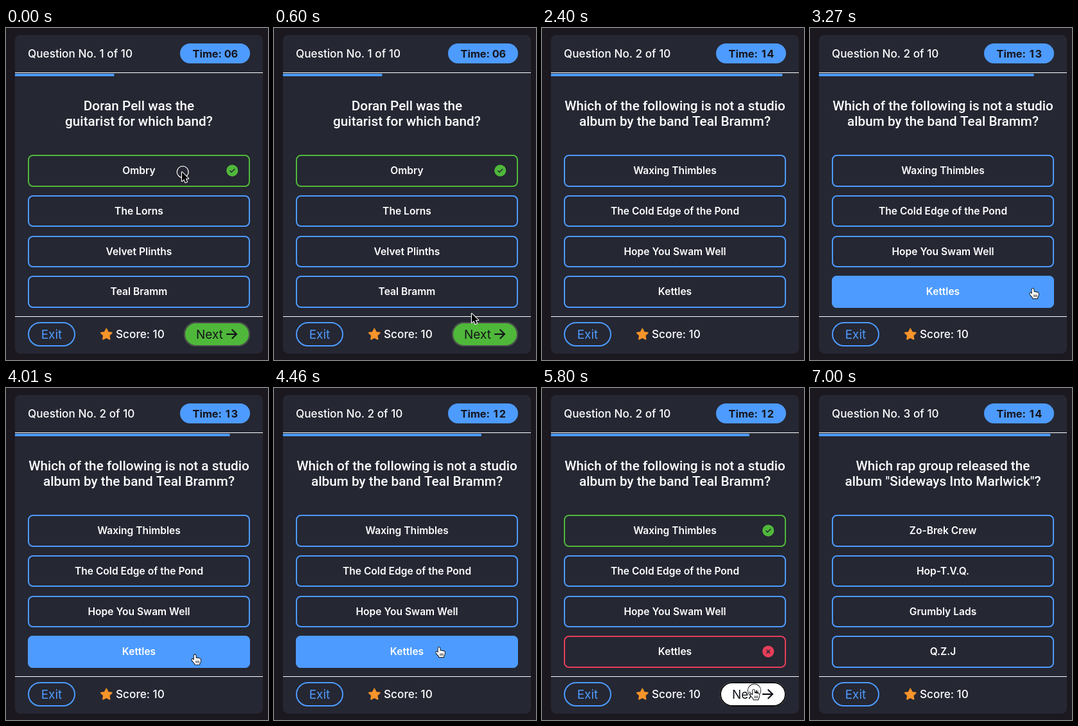
Write an HTML page with a canvas that moves like this. It is 408 px wide and 516 px high and loops after 7300 ms.

```html
<!DOCTYPE html>
<html lang="en">
<head>
<meta charset="utf-8">
<title>Music quiz</title>
<style>
  html, body { margin: 0; width: 100%; height: 100%; overflow: hidden; background: #1b191f; }
  canvas { display: block; width: 408px; height: 516px; }
</style>
</head>
<body>
<canvas id="stage"></canvas>
<script>
const W = 408, H = 516, LOOP = 7300;
const BG = '#1b191f', CARD = '#252733', BLUE = '#4d9bff', GREEN = '#4fb83a',
      RED = '#e63e58', WHITE = '#fff', INK = '#16141b', ORANGE = '#f8952a';
const UI = 'Inter, "Open Sans", sans-serif';
const HEAD = 'Roboto, Inter, sans-serif';

const QUESTIONS = [
  { title: ['Doran Pell was the', 'guitarist for which band?'],
    options: ['Ombry', 'The Lorns', 'Velvet Plinths', 'Teal Bramm'], right: 0, pick: 0 },
  { title: ['Which of the following is not a studio', 'album by the band Teal Bramm?'],
    options: ['Waxing Thimbles', 'The Cold Edge of the Pond', 'Hope You Swam Well', 'Kettles'], right: 0, pick: 3 },
  { title: ['Which rap group released the', 'album "Sideways Into Marlwick"?'],
    options: ['Zo-Brek Crew', 'Hop-T.V.Q.', 'Grumbly Lads', 'Q.Z.J'] }
];

// Moments in ms
const SECOND = 1350, ENTER = 3270, ANSWER = 4610, THIRD = 6100;
const TICKS = [2400, ENTER, 4310];
const CLICKS = [0, 1200, ANSWER, 5800];
const CLICK_LEN = 150;

// Pointer way points: time, x, y
const PATH = [
  [0, 274, 224], [600, 308, 444], [1050, 330, 471], [1350, 330, 471],
  [3260, 347, 406.5], [3860, 301, 418], [4460, 257, 404.5], [4610, 257, 405],
  [5060, 394, 440], [5360, 334, 471], [5500, 329.5, 470.5], [5800, 329.5, 470.5], [5950, 331, 489]
];
const STEP = 150, STEP_STARTS = [0, 3260, 5500];

const ARROW = new Path2D('M0 0V14L3.2 11L5.4 16L8 15L5.8 10H10.2Z');
const HAND = new Path2D('M-1.6 1Q0-1 1.6 1L2 6.6Q3.5 5.3 5 6.8Q6.6 5.8 8 7.4Q10.2 6.8 10.6 9' +
  'L10.2 13Q9.6 15 8.6 16V18H0L-.5 16L-5 10.8Q-6.6 8-4 8L-1.6 10Z');
const KNUCKLES = new Path2D('M2.2 11.5V15M4.7 11.5V15M7.2 11.5V15');

const canvas = document.getElementById('stage');
const ctx = canvas.getContext('2d');
const dpr = window.devicePixelRatio || 1;
canvas.width = W * dpr;
canvas.height = H * dpr;

function box(x, y, w, h, r, fill, border) {
  ctx.beginPath();
  ctx.roundRect(x, y, w, h, r);
  if (fill) { ctx.fillStyle = fill; ctx.fill(); }
  if (!border) return;
  ctx.beginPath();
  ctx.roundRect(x + 1, y + 1, w - 2, h - 2, r - 1);
  ctx.strokeStyle = border;
  ctx.lineWidth = 2;
  ctx.stroke();
}

function text(str, x, y, font, color, align = 'left') {
  ctx.font = font;
  ctx.fillStyle = color;
  ctx.textAlign = align;
  ctx.fillText(str, x, y);
}

function line(points, color, width) {
  ctx.beginPath();
  for (const [x, y] of points) ctx.lineTo(x, y);
  ctx.strokeStyle = color;
  ctx.lineWidth = width;
  ctx.stroke();
}

function disc(x, y, r, color) {
  ctx.beginPath();
  ctx.arc(x, y, r, 0, 2 * Math.PI);
  ctx.fillStyle = color;
  ctx.fill();
}

function ring(x, y, r, color, width) {
  ctx.beginPath();
  ctx.arc(x, y, r, 0, 2 * Math.PI);
  ctx.strokeStyle = color;
  ctx.lineWidth = width;
  ctx.stroke();
}

function badge(x, y, ok) {
  disc(x, y, 9.1, ok ? GREEN : RED);
  if (ok) {
    line([[x - 3.4, y + .2], [x - 1, y + 2.5], [x + 3.5, y - 2.2]], CARD, 1.5);
  } else {
    line([[x - 2.3, y - 2.3], [x + 2.3, y + 2.3]], CARD, 1.5);
    line([[x + 2.3, y - 2.3], [x - 2.3, y + 2.3]], CARD, 1.5);
  }
}

function star(x, y, r) {
  ctx.beginPath();
  for (let i = 0; i < 10; i++) {
    const a = (i / 5 - .5) * Math.PI, d = i % 2 ? r * .5 : r;
    ctx.lineTo(x + d * Math.cos(a), y + d * Math.sin(a));
  }
  ctx.closePath();
  ctx.fillStyle = ctx.strokeStyle = ORANGE;
  ctx.lineWidth = 2;
  ctx.fill();
  ctx.stroke();
}

// The pointer advances in short holds
function pointerAt(t) {
  const from = STEP_STARTS.filter(s => s <= t).pop();
  const q = from + Math.floor((t - from) / STEP) * STEP;
  let i = 0;
  while (i < PATH.length - 2 && PATH[i + 1][0] <= q) i++;
  const [t0, x0, y0] = PATH[i], [t1, x1, y1] = PATH[i + 1];
  const u = Math.min(1, (q - t0) / (t1 - t0)), e = u * u * (3 - 2 * u);
  return { x: x0 + (x1 - x0) * e, y: y0 + (y1 - y0) * e };
}

function stateAt(t) {
  const index = t < SECOND ? 0 : t < THIRD ? 1 : 2;
  const answered = index === 0 || (index === 1 && t >= ANSWER);
  const shown = index === 0 || (t >= ENTER && t < THIRD);
  const pointer = shown ? pointerAt(t) : null;
  const time = index === 0 ? 6
    : index === 1 ? 15 - TICKS.filter(k => t >= k).length
    : t >= 7000 ? 14 : 15;
  return {
    index, answered, pointer, time,
    hover: shown && !answered ? 3 : -1,
    overNext: shown && answered && pointer.x > 277 && pointer.x < 380 && pointer.y > 457 && pointer.y < 495,
    click: CLICKS.some(c => t >= c && t < c + CLICK_LEN)
  };
}

function drawHeader(s) {
  text(`Question No. ${s.index + 1} of 10`, 34, 46, `500 17.2px ${UI}`, WHITE);
  box(271, 24, 109, 31, 15.5, BLUE);
  const font = `700 16.4px ${UI}`;
  const digits = String(s.time).padStart(2, '0');
  text('Time:', 290.5, 46, font, INK);
  text(digits[0], 345.3, 46, font, INK, 'center');
  text(digits[1], 355.8, 46, font, INK, 'center');
  ctx.fillStyle = WHITE;
  ctx.fillRect(14, 69, 386, 1);
  ctx.fillStyle = BLUE;
  ctx.fillRect(14, 71, 386 * s.time / 15, 4);
}

function drawOptions(s) {
  const q = QUESTIONS[s.index];
  q.title.forEach((row, i) => text(row, 207, 128 + 24.3 * i, `500 20.75px ${HEAD}`, WHITE, 'center'));
  q.options.forEach((name, i) => {
    // Edges sit on whole pixels
    const y = 197.4 + 62.65 * i;
    const top = Math.round(y), bottom = Math.round(y + 49.4);
    const right = s.answered && i === q.right;
    const wrong = s.answered && i === q.pick && !right;
    box(34, top, 346, bottom - top, 8, s.hover === i ? BLUE : null, right ? GREEN : wrong ? RED : BLUE);
    text(name, 207, y + 29.8, `600 15.6px ${UI}`, WHITE, 'center');
    if (right || wrong) badge(352.3, y + 24.2, right);
  });
}

function drawFooter(s) {
  const font = `400 19px ${UI}`;
  ctx.fillStyle = WHITE;
  ctx.fillRect(14, 448, 386, 1);
  box(34, 457, 74, 38, 19, null, BLUE);
  text('Exit', 71, 482.5, font, BLUE, 'center');
  star(156.3, 476.5, 8.8);
  text('Score: 10', 171, 482, `500 17.2px ${UI}`, WHITE);
  if (!s.answered) return;
  box(277, 457, 103, 38, 19, s.overNext ? WHITE : GREEN, s.overNext ? '#0b0b0d' : '#4b4a4e');
  text('Next', 296, 482.5, font, INK);
  line([[344, 475.8], [359, 475.8]], INK, 2.3);
  line([[352.4, 469.3], [359, 475.8], [352.4, 482.3]], INK, 2.3);
}

function drawPointer(s) {
  if (!s.pointer) return;
  const { x, y } = s.pointer;
  if (s.click) {
    ring(x + 1.2, y - .3, 10, INK, 1.2);
    ring(x + 1.2, y - .3, 9, WHITE, 1.3);
  }
  const hand = s.hover >= 0 || s.overNext;
  const shape = hand ? HAND : ARROW;
  ctx.save();
  ctx.translate(x, y);
  if (hand) {
    ctx.translate(0, -1.5);
    ctx.scale(.85, .85);
  }
  ctx.lineWidth = hand ? 2 : 2.2;
  ctx.strokeStyle = hand ? '#000' : WHITE;
  ctx.fillStyle = hand ? WHITE : '#000';
  ctx.stroke(shape);
  ctx.fill(shape);
  if (hand) {
    ctx.lineWidth = 1;
    ctx.stroke(KNUCKLES);
  }
  ctx.restore();
}

function draw(t) {
  const s = stateAt(t);
  ctx.setTransform(dpr, 0, 0, dpr, 0, 0);
  ctx.lineCap = ctx.lineJoin = 'round';
  ctx.textBaseline = 'alphabetic';
  ctx.fillStyle = BG;
  ctx.fillRect(0, 0, W, H);
  box(14, 11, 386, 495, 8, CARD);
  drawHeader(s);
  drawOptions(s);
  drawFooter(s);
  drawPointer(s);
}

const start = performance.now();
function tick() {
  draw((performance.now() - start) % LOOP);
  requestAnimationFrame(tick);
}
tick();
</script>
</body>
</html>
```
